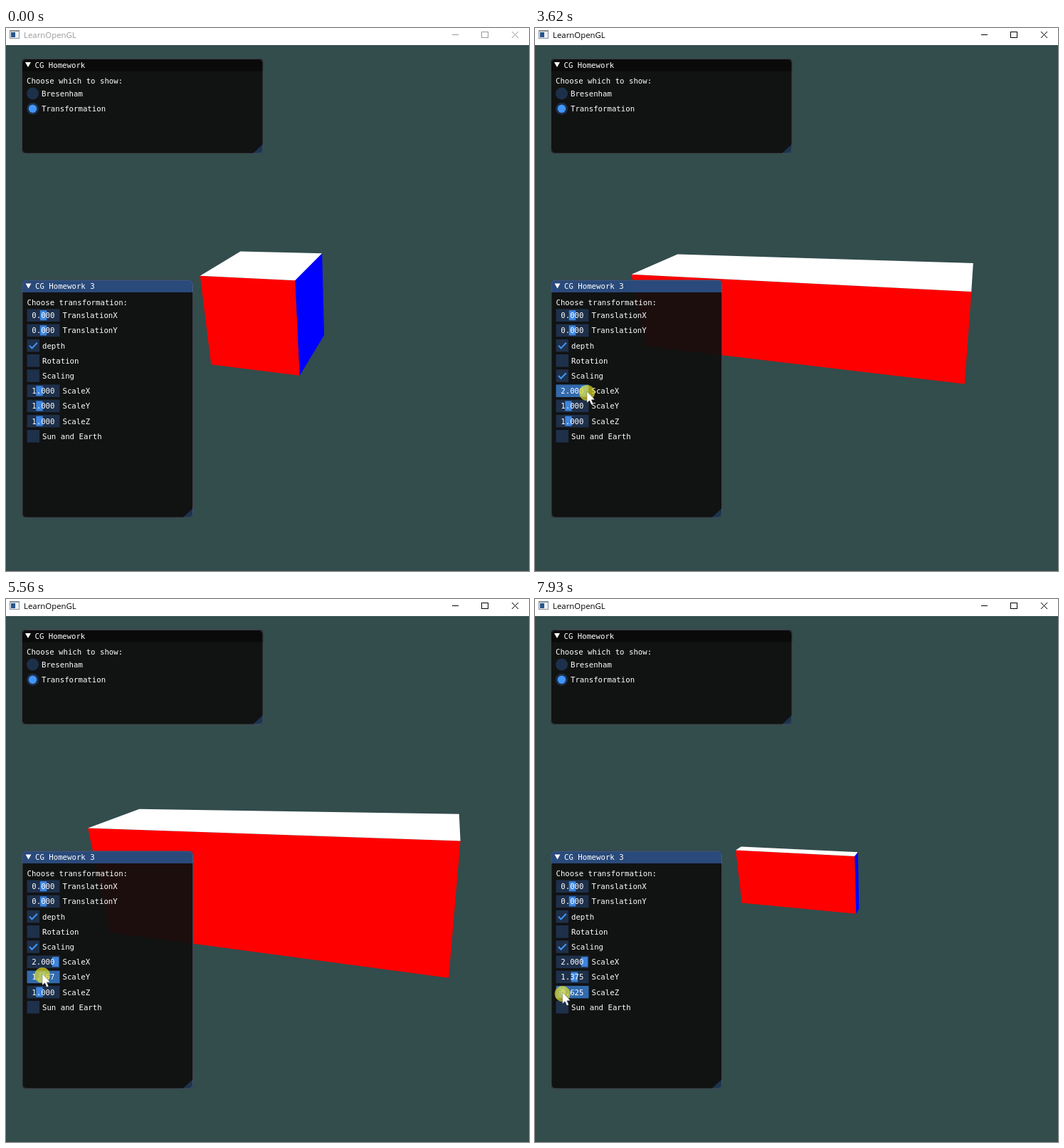
Write an HTML page with a canvas that moves like this. It is 735 px wide and 762 px high and loops after 8 s.

```html
<!DOCTYPE html>
<html>
<head>
<meta charset="utf-8">
<style>
html, body { margin: 0; width: 100%; height: 100%; overflow: hidden; background: #334c4c; }
canvas { display: block; }
</style>
</head>
<body>
<canvas id="stage" width="735" height="762"></canvas>
<script>
const ctx = document.getElementById('stage').getContext('2d');
const LOOP = 8000;
const MONO = '10.7px "DejaVu Sans Mono", monospace';
const BLUE = '#4296fa';

// Screen refreshes: each span between two starts holds eleven steps.
const starts = [150, 1010, 1550, 2380, 3240, 4110, 4960, 5790, 6670, 7510, 8430];

// Pointer path: time, x, y
const path = [
  [150, 532, 741], [500, 240, 600], [850, 16, 482], [1000, 16, 482], [1090, 34, 485], [1750, 34, 485],
  [2310, 50, 529], [2460, 51, 524], [2614, 51, 519], [2850, 51, 510], [3160, 51, 510],
  [3240, 62, 510], [3318, 73, 510], [3700, 73, 510], [4030, 39, 510], [4110, 32, 510],
  [4187, 70, 510], [4265, 73, 510], [4660, 73, 510], [4860, 60, 521], [4980, 45, 527],
  [5180, 28, 527], [5488, 68.5, 527], [5563, 51, 526], [5640, 50, 526], [5714, 56.7, 526],
  [5790, 66.7, 527], [5950, 58.3, 527], [6110, 55.5, 527], [6400, 55.5, 527], [6670, 46, 551],
  [6820, 30, 551], [6975, 36.7, 551], [7200, 37, 552], [7434, 55.5, 552], [7510, 50, 552],
  [7600, 33, 552], [7887, 38.6, 552], [8000, 38.6, 552]
];
const click = [1550, 1700];
const drags = [[2890, 4450], [4985, 6400], [6700, LOOP]];  // scale X, Y, Z

const within = (t, [from, to]) => t >= from && t < to;

function stepTime(t) {
  if (t < starts[0]) return 0;
  const i = starts.findLastIndex(s => t >= s);
  const step = (starts[i + 1] - starts[i]) / 11;
  return starts[i] + Math.floor((t - starts[i]) / step + 0.2) * step;
}

function pointer(t) {
  const i = path.findIndex(k => k[0] > t);
  if (i < 0) return path[path.length - 1].slice(1);
  if (i === 0) return path[0].slice(1);
  const a = path[i - 1], b = path[i], p = (t - a[0]) / (b[0] - a[0]);
  return [a[1] + (b[1] - a[1]) * p, a[2] + (b[2] - a[2]) * p];
}

function scaleValue(t, [from, to]) {
  if (t < from) return 1;
  const v = 1 + (pointer(Math.min(t, to))[0] - 47) / 22.5;
  return Math.round(Math.min(2, Math.max(0.5, v)) * 24) / 24;
}

function text(str, x, y, color = '#fff', font = MONO) {
  ctx.font = font;
  ctx.fillStyle = color;
  ctx.fillText(str, x, y);
}

function rect(x, y, w, h, color) {
  ctx.fillStyle = color;
  ctx.fillRect(x, y, w, h);
}

function disc(x, y, r, color) {
  ctx.fillStyle = color;
  ctx.beginPath();
  ctx.arc(x, y, r, 0, 7);
  ctx.fill();
}

function polygon(points, color) {
  ctx.fillStyle = color;
  ctx.beginPath();
  points.forEach(p => ctx.lineTo(...p));
  ctx.closePath();
  ctx.fill();
}

function line(points, color, width = 1) {
  ctx.strokeStyle = color;
  ctx.lineWidth = width;
  ctx.beginPath();
  points.forEach((p, i) => i ? ctx.lineTo(...p) : ctx.moveTo(...p));
  ctx.stroke();
}

// Box turned 30 degrees about (1, -1, 0), seen from distance 10 with a 60 degree lens.
function drawCube(dims) {
  const c = Math.cos(Math.PI / 6), h = (1 + c) / 2, k = (1 - c) / 2, q = Math.SQRT1_2 / 2;
  const focal = 369 * Math.sqrt(3);
  const project = corner => {
    const [x, y, z] = corner.map((n, i) => n * dims[i]);
    const depth = 10 - (q * x + q * y + c * z);
    return [367.5 + focal * (h * x - k * y - q * z) / depth,
            393 - focal * (-k * x + h * y - q * z) / depth];
  };
  const faces = [
    ['#f00', [-1, 1, 1], [1, 1, 1], [1, -1, 1], [-1, -1, 1]],
    ['#fff', [-1, 1, -1], [1, 1, -1], [1, 1, 1], [-1, 1, 1]],
    ['#00f', [1, 1, 1], [1, 1, -1], [1, -1, -1], [1, -1, 1]]
  ];
  for (const [color, ...corners] of faces) {
    const p = corners.map(project);
    const facing = (p[2][0] - p[0][0]) * (p[3][1] - p[1][1]) - (p[2][1] - p[0][1]) * (p[3][0] - p[1][0]);
    if (facing > 0) polygon(p, color);
  }
}

function drawTitleBar(active) {
  const ink = active ? '#000' : '#999';
  rect(0, 0, 735, 24, '#fff');
  rect(5, 3, 14, 12, '#8a9199');
  rect(6, 5, 12, 9, '#eef2f5');
  rect(7, 6, 6, 7, '#28568c');
  text('LearnOpenGL', 25, 14, ink, '11.4px "Open Sans", sans-serif');
  line([[627, 9.5], [636, 9.5]], ink);
  ctx.strokeRect(668.5, 5.5, 9, 8);
  line([[711, 5], [720, 14]], ink);
  line([[720, 5], [711, 14]], ink);
}

function drawPanel(title, x, y, w, h, titleColor) {
  ctx.save();
  ctx.beginPath();
  ctx.roundRect(x, y, w, h, 6);
  ctx.clip();
  rect(x, y, w, h, 'rgba(15,15,15,.94)');
  rect(x, y, w, 17.5, titleColor);
  polygon([[x + w, y + h - 14], [x + w, y + h], [x + w - 15, y + h]], 'rgba(66,150,250,.25)');
  ctx.restore();
  ctx.strokeStyle = 'rgba(110,110,128,.5)';
  ctx.lineWidth = 1;
  ctx.beginPath();
  ctx.roundRect(x + 0.5, y + 0.5, w - 1, h - 1, 6);
  ctx.stroke();
  polygon([[x + 5, y + 5], [x + 13, y + 5], [x + 9, y + 12]], '#fff');
  text(title, x + 18.5, y + 12.5);
}

function radio(label, y, on) {
  disc(37.5, y, 8.5, 'rgba(41,74,122,.54)');
  if (on) disc(37.5, y, 5.7, BLUE);
  text(label, 50, y + 4);
}

function drawCursor(x, y) {
  const shape = [[0, 0], [0, 16], [3.6, 12.7], [6.2, 18.6], [8.8, 17.5], [6.2, 11.8], [11, 11.6]];
  polygon(shape.map(([dx, dy]) => [x + dx, y + dy]), '#fff');
  ctx.strokeStyle = 'rgba(0,0,0,.45)';
  ctx.lineWidth = 0.6;
  ctx.stroke();
}

function draw(now) {
  const t = stepTime(now % LOOP);
  const [px, py] = pointer(t);
  const activeDrag = drags.findIndex(d => within(t, d));
  const pressed = activeDrag >= 0 || within(t, click);
  const scaling = t >= click[1];
  const scale = drags.map(d => scaleValue(t, d));
  const pulse = scaling ? 0.1 + Math.abs(Math.sin((t - 4545) / 1000)) : 1;

  rect(0, 0, 735, 762, '#334c4c');
  drawCube(scale.map(v => v * v * pulse));
  drawTitleBar(t >= click[0]);

  drawPanel('CG Homework', 22, 43, 339.5, 133.5, '#0a0a0a');
  text('Choose which to show:', 29, 77.5);
  radio('Bresenham', 92, false);
  radio('Transformation', 113.3, true);

  drawPanel('CG Homework 3', 22.5, 353.5, 240.5, 334, '#294a7a');
  text('Choose transformation:', 29.5, 388.5);

  const rowY = i => 403.2 + 21.2 * i;
  const frame = (i, w, active) => {
    const y = rowY(i) - 8.8;
    const hover = t >= click[0] && !pressed && px >= 29.5 && px < 29.5 + w && py >= y && py < y + 17.6;
    rect(29.5, y, w, 17.6, active ? 'rgba(66,150,250,.67)' : hover ? 'rgba(66,150,250,.4)' : 'rgba(41,74,122,.54)');
  };
  const slider = (i, label, value, center, active) => {
    frame(i, 46, active);
    rect(center - 4.7, rowY(i) - 7, 9.4, 14, active ? BLUE : '#3d85e0');
    text(value.toFixed(3), 36.3, rowY(i) + 4);
    text(label, 79.5, rowY(i) + 4);
  };
  const checkbox = (i, label, on) => {
    const y = rowY(i);
    frame(i, 17.6, false);
    if (on) line([[33, y], [36.5, y + 3.8], [43.8, y - 3.8]], BLUE, 2);
    text(label, 51, y + 4);
  };

  slider(0, 'TranslationX', 0, 52.5);
  slider(1, 'TranslationY', 0, 52.5);
  checkbox(2, 'depth', true);
  checkbox(3, 'Rotation', false);
  checkbox(4, 'Scaling', scaling);
  scale.forEach((v, i) => slider(5 + i, 'Scale' + 'XYZ'[i], v, 47 + 22.5 * (v - 1), i === activeDrag));
  checkbox(8, 'Sun and Earth', false);

  if (t >= starts[0]) {
    if (pressed) disc(px, py + 2, 11, 'rgba(225,220,40,.7)');
    drawCursor(px, py);
  }
}

function tick() {
  draw(performance.now());
  requestAnimationFrame(tick);
}
tick();
</script>
</body>
</html>
```
